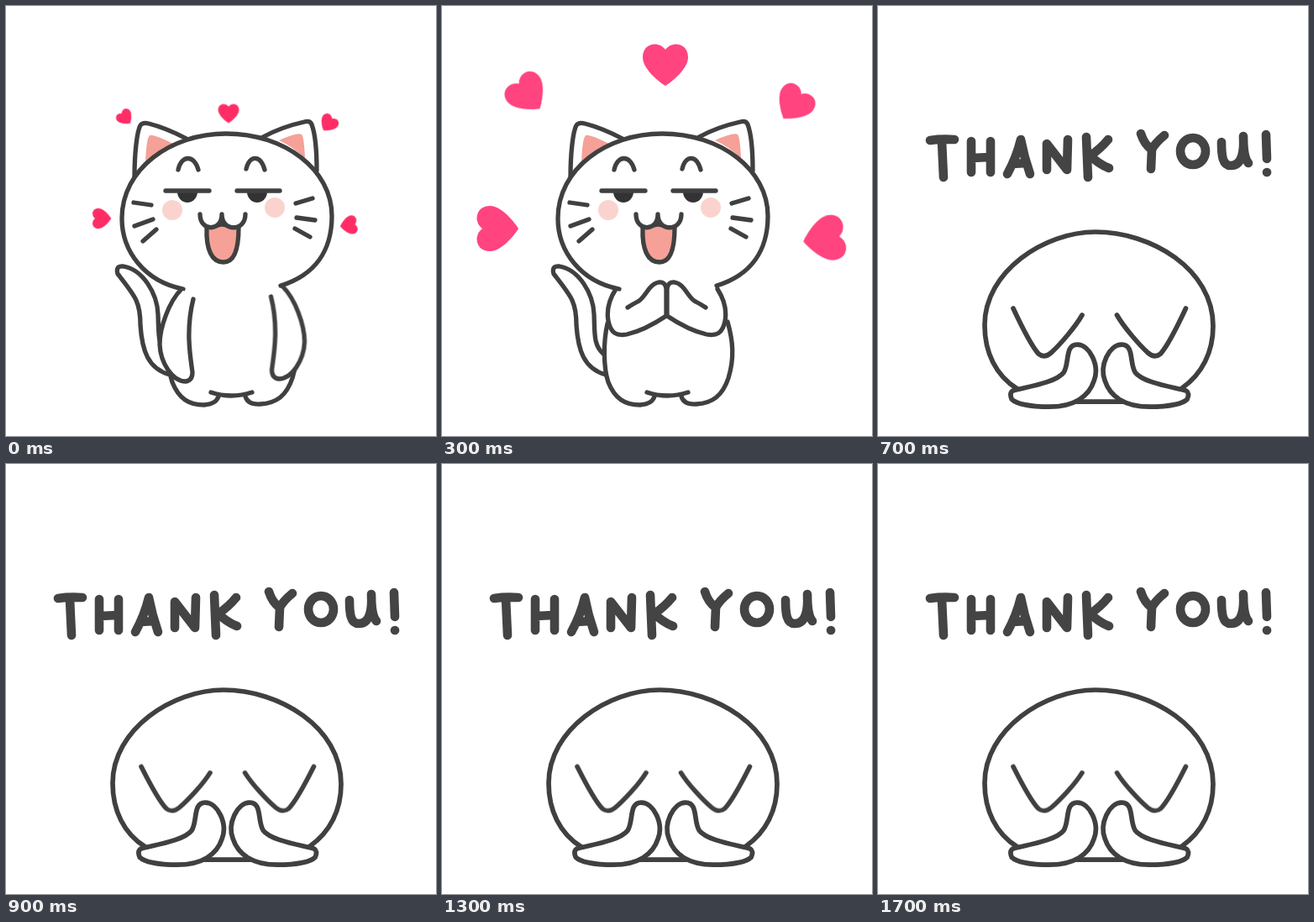
Animation of 512x512 px, one loop 1800 ms. Source, as an HTML page without scripts:

```html
<!DOCTYPE html>
<html lang="en">
<head>
<meta charset="utf-8">
<title>Thank you cat</title>
<style>
  html, body { margin: 0; width: 100%; height: 100%; overflow: hidden; background: #fff; }
  svg { display: block; width: 100vw; height: 100vh; }
  .ink { fill: #fff; stroke: #404040; stroke-width: 5.7; stroke-linecap: round; stroke-linejoin: round; }
  .standing { stroke-width: 5.3; }
  .line { fill: none; }
  .pink { fill: #f5a197; stroke: none; }
  .cheek { fill: #fbd3ce; stroke: none; }
  .pupil { fill: #333; stroke: none; }
  .lettering { fill: none; stroke: #444; stroke-width: 10.6; stroke-linecap: round; stroke-linejoin: round; }

  /* Every pose is held for 100 ms. */
  .standing, .bowing, .arms-down, .arms-half, .arms-joined, .hearts, .head, .face,
  .ears-up, .ears-down, .bow-head, .pop { animation: 1.8s step-end infinite; }

  .standing { animation-name: standing; }
  .bowing { animation-name: bowing; }
  .hearts { animation-name: hearts; }
  .arms-down { animation-name: arms-down; }
  .arms-half { animation-name: arms-half; }
  .arms-joined { animation-name: arms-joined; }
  .head { animation-name: head; }
  .face { animation-name: face; }
  .ears-up { animation-name: ears-up; }
  .ears-down { animation-name: ears-down; transform-origin: 264px 362px; }
  .bow-head { animation-name: bow-head; transform-origin: 263px 457px; }
  .pop { animation-name: pop; transform-origin: 263px 178px; }
  .wobble { animation: wobble .2s step-end infinite; transform-origin: 263px 178px; }
  .breathe { animation: breathe .2s step-end infinite; transform-origin: 263px 457px; }
  .heart { animation: fly 1.8s infinite; }

  @keyframes standing { 0% { opacity: 1 } 27.7%, 100% { opacity: 0 } }
  @keyframes bowing { 0% { opacity: 0 } 27.7%, 100% { opacity: 1 } }
  @keyframes hearts { 0% { opacity: 1 } 22.2%, 100% { opacity: 0 } }
  @keyframes arms-down { 0% { opacity: 1 } 5.5%, 100% { opacity: 0 } }
  @keyframes arms-half { 0% { opacity: 0 } 5.5% { opacity: 1 } 11.1%, 100% { opacity: 0 } }
  @keyframes arms-joined {
    0% { opacity: 0; transform: none }
    11.1% { opacity: 1; transform: none }
    22.2%, 100% { opacity: 1; transform: translateY(45px) }
  }
  @keyframes head { 0% { transform: none } 22.2%, 100% { transform: translateY(58px) } }
  @keyframes face { 0% { transform: none } 22.2%, 100% { transform: translateY(25px) } }
  @keyframes ears-up { 0% { opacity: 1 } 33.3%, 100% { opacity: 0 } }
  @keyframes ears-down {
    0% { opacity: 0; transform: none }
    33.3% { opacity: 1; transform: scaleY(1.06) }
    38.8% { opacity: 1; transform: none }
    44.4%, 100% { opacity: 1; transform: scaleY(.93) }
  }
  @keyframes bow-head { 0% { transform: scale(1.03, .984) } 38.8%, 100% { transform: none } }
  @keyframes breathe { 0% { transform: scale(1.008, .994) } 49.5%, 100% { transform: none } }
  @keyframes pop {
    0% { transform: scale(0) }
    27.7% { transform: translate(3px, 40px) scale(.52) rotate(1deg) }
    33.3% { transform: scale(1.04) }
    38.8%, 100% { transform: none }
  }
  @keyframes wobble { 0% { transform: rotate(2deg) } 49.5%, 100% { transform: none } }
  @keyframes fly {
    0% {
      fill: #ff2d66;
      transform: translate(var(--from)) rotate(var(--turn)) scale(var(--small));
      animation-timing-function: steps(3, end);
    }
    16.6%, 100% {
      fill: #ff447f;
      transform: translate(var(--to)) rotate(var(--turn)) scale(var(--big));
    }
  }
</style>
</head>
<body>
<svg viewBox="0 0 512 512" role="img" aria-label="A cat bows: THANK YOU!">
  <defs>
    <path id="heart" d="M0 25C-8 20-27 5-27-9C-27-26-8-29 0-18C8-29 27-26 27-9C27 5 8 20 0 25Z"
      stroke-linejoin="round"/>
    <path id="arm-down" d="M209 337C194 352 183 383 183 403C184 425 198 447 214 447Q222 446 222 436C219 415 214 385 223 349"/>
    <path id="arm-half" d="M209 337C194 350 186 385 191 402C197 414 222 412 248 402C258 397 256 382 245 383Q230 386 218 388Q217 370 222 352"/>
    <path id="arm-joined" d="M207 337C198 351 196 364 198 375C201 390 208 393 220 391C238 387 252 379 267 369V337Q266 328 258 329C246 331 242 348 233 352Q227 355 221 359"/>
    <path id="arm-bow" d="M161 459C180 454 213 449 222 437C229 426 223 404 238 404C253 404 265 429 258 447C252 466 234 478 205 478C180 478 165 474 160 469Q157 462 161 459Z"/>
    <g id="ear-up">
      <path class="line" d="M158 376C165 364 183 335 190 327Q197 319 204 326C215 334 235 358 243 368"/>
      <path class="pink" d="M178 373C183 358 190 344 196 342C205 344 217 360 223 369Z"/>
    </g>
    <path id="ear-down" class="line" d="M161 360C168 375 183 405 191 414Q198 420 206 413C217 403 235 382 243 368"/>
  </defs>

  <g class="hearts">
    <use href="#heart" class="heart" style="--from:265px,128px;--to:266px,70px;--turn:0deg;--small:.46;--big:1"/>
    <use href="#heart" class="heart" style="--from:384px,140px;--to:419px,117px;--turn:36deg;--small:.4;--big:.84"/>
    <use href="#heart" class="heart" style="--from:408px,261px;--to:455px,277px;--turn:82deg;--small:.41;--big:1"/>
    <use href="#heart" class="heart" style="--from:114px,253px;--to:66px,265px;--turn:-90deg;--small:.45;--big:1"/>
    <use href="#heart" class="heart" style="--from:142px,133px;--to:102px,105px;--turn:-40deg;--small:.36;--big:.9"/>
  </g>

  <g class="standing ink">
    <path d="M195 439C169 432 162 410 160 380C160 352 154 346 133 319Q130 309 140 310C163 314 180 342 181 367C182 390 180 404 193 415"/>
    <path d="M197 378C192 400 192 430 198 448C206 468 218 475 236 475Q250 474 253 465L285 465Q288 475 303 474C322 473 334 464 341 443C348 420 347 400 340 376" stroke="none"/>
    <path class="line" d="M197 378C192 400 192 430 198 448C206 468 218 475 236 475Q250 474 253 465M285 465Q288 475 303 474C322 473 334 464 341 443C348 420 347 400 340 376M244 460Q268 468 293 460"/>

    <g class="head">
      <path d="M153 203C153 175 156 149 160 142Q163 138 170 140Q190 145 215 158"/>
      <path d="M370 196C370 168 367 149 364 141Q362 136 355 138Q328 144 306 156"/>
      <path class="pink" d="M166 187Q167 158 171 154Q175 152 199 164Q179 173 166 187Z"/>
      <path class="pink" d="M325 160Q347 150 352 153Q355 156 356 182Q343 168 325 160Z"/>
      <path d="M211 337C165 328 138 292 138 253C138 194 196 152 262 152C332 152 388 195 388 250C388 290 369 320 327 333"/>
      <g class="face">
        <circle class="cheek" cx="198" cy="243" r="12"/>
        <circle class="cheek" cx="320" cy="240" r="12"/>
        <path class="pupil" d="M204 221a12 13 0 0 0 24 0zM287 221a12 13 0 0 0 24 0z"/>
        <path class="line" d="M205 195C209 177 224 177 229 195M286 194C290 177 303 177 308 195M190 220H242M275 220H326"/>
        <path class="line" d="M152 234L173 237M153 262L175 254M163 280L179 266M345 235L365 229M346 252L368 255M344 265L362 275"/>
        <path d="M239 264C238 290 245 305 259 305C273 305 277 285 277 264L257 260Z" style="fill:#f5a197"/>
        <path d="M231 248C231 269 257 269 257 248C257 269 285 269 285 248"/>
      </g>
    </g>

    <g class="arms-down">
      <use href="#arm-down"/>
      <use href="#arm-down" transform="matrix(-1 0 0 1 538.5 -3)"/>
    </g>
    <g class="arms-half">
      <use href="#arm-half"/>
      <use href="#arm-half" transform="matrix(-1 0 0 1 537 0)"/>
    </g>
    <g class="arms-joined">
      <use href="#arm-joined"/>
      <use href="#arm-joined" transform="matrix(-1 0 0 1 535 0)"/>
    </g>
  </g>

  <g class="bowing">
    <g class="ink">
      <g class="bow-head"><g class="breathe">
        <path d="M166 456C140 440 127 412 127 380C127 316 198 269 259 269C325 269 399 313 399 381C399 412 386 438 362 455"/>
      </g></g>
      <g class="ears-up">
        <use href="#ear-up"/>
        <use href="#ear-up" transform="matrix(-1 0 0 1 527.5 0)"/>
      </g>
      <g class="ears-down">
        <use href="#ear-down"/>
        <use href="#ear-down" transform="matrix(-1 0 0 1 527.5 0)"/>
      </g>
      <g transform="translate(-.8 -.8)">
        <path d="M232 472H298"/>
        <use href="#arm-bow"/>
        <use href="#arm-bow" transform="matrix(-1 0 0 1 529 0)"/>
      </g>
    </g>

    <g class="pop"><g class="wobble lettering">
      <path d="M62 160Q75 158 91 159M76 161L78 204"/>
      <path d="M111 161V198M134 161V198M112 181L133 180"/>
      <path d="M154 200Q165 180 170 159Q174 180 181 200M160 188L177 187"/>
      <path d="M201 195L201 164L225 195L226 159"/>
      <path d="M248 156L250 204M274 159Q265 170 253 178Q262 188 275 193"/>
      <path d="M313 152Q317 165 326 171L325 194M341 154Q330 163 326 171"/>
      <ellipse cx="375" cy="173" rx="15" ry="16"/>
      <path d="M409 162C409 178 410 190 420 190C434 190 436 172 435 155Q435 180 441 187"/>
      <path d="M462 153L463 182M463 198h.1"/>
    </g></g>
  </g>
</svg>
</body>
</html>
```
